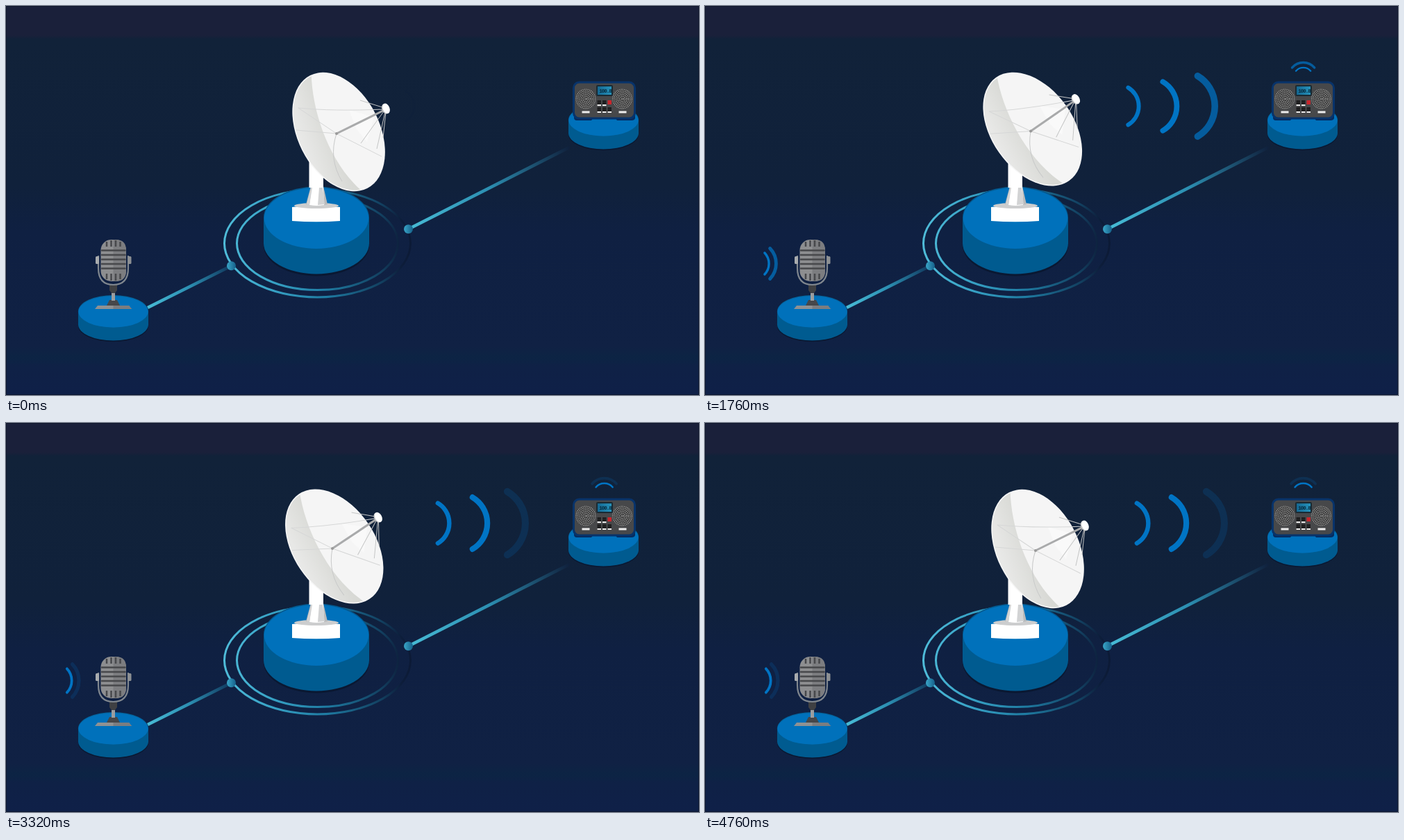
An HTML page that plays this animation: 998 px wide and 561 px high, repeating every 4.8 s.

```html
<!DOCTYPE html>
<html lang="en">
<head>
<meta charset="utf-8">
<title>Broadcast</title>
<style>
  html, body { margin: 0; width: 100%; height: 100%; overflow: hidden; background: #10213d; }
  svg { display: block; width: 100%; height: 100%; }
  .wave { fill: none; stroke: #0074c4; stroke-linecap: round; }
  .lcd { font: bold 7.5px "Liberation Mono", monospace; fill: #06293c; }
</style>
</head>
<body>
<svg viewBox="0 0 998 561">
  <defs>
    <linearGradient id="sky" x2="0" y2="1">
      <stop offset="0" stop-color="#1a203a"/>
      <stop offset=".075" stop-color="#1a203a"/>
      <stop offset=".085" stop-color="#112239"/>
      <stop offset=".46" stop-color="#10213b"/>
      <stop offset=".58" stop-color="#0f2042"/>
      <stop offset=".875" stop-color="#102144"/>
      <stop offset=".905" stop-color="#0c2444"/>
      <stop offset=".925" stop-color="#0f2146"/>
      <stop offset="1" stop-color="#0f2048"/>
    </linearGradient>
    <linearGradient id="ring" gradientUnits="userSpaceOnUse" x1="314" x2="582" y1="0" y2="0">
      <stop offset="0" stop-color="#4fbcd9"/>
      <stop offset=".25" stop-color="#38a3c6"/>
      <stop offset=".55" stop-color="#1f7ca3"/>
      <stop offset=".85" stop-color="#123f5f"/>
      <stop offset=".95" stop-color="#0d1e3b"/>
      <stop offset="1" stop-color="#0c1a36"/>
    </linearGradient>
    <linearGradient id="linkA" gradientUnits="userSpaceOnUse" x1="204" y1="435" x2="324" y2="375">
      <stop offset="0" stop-color="#48bcd6"/>
      <stop offset=".5" stop-color="#2c8fb2"/>
      <stop offset="1" stop-color="#10375c"/>
    </linearGradient>
    <linearGradient id="linkB" gradientUnits="userSpaceOnUse" x1="579" y1="322" x2="811" y2="204">
      <stop offset="0" stop-color="#48bcd6"/>
      <stop offset=".5" stop-color="#2c8fb2"/>
      <stop offset="1" stop-color="#10213d"/>
    </linearGradient>
    <linearGradient id="dot">
      <stop offset="0" stop-color="#3aa6c8"/>
      <stop offset="1" stop-color="#15608a"/>
    </linearGradient>
    <linearGradient id="shade" gradientUnits="userSpaceOnUse" x1="416" x2="500" y1="190" y2="160">
      <stop offset="0" stop-color="#ebebea"/>
      <stop offset=".6" stop-color="#d8d9d5"/>
      <stop offset="1" stop-color="#d4d5d1"/>
    </linearGradient>
    <linearGradient id="lcd" x2="1">
      <stop offset="0" stop-color="#14658f"/>
      <stop offset="1" stop-color="#2795bd"/>
    </linearGradient>
    <clipPath id="bowl">
      <ellipse rx="89.5" ry="57.5" transform="translate(479.1 181.5) rotate(63.3)"/>
    </clipPath>
    <g id="speaker">
      <circle r="14.5" fill="#383838"/>
      <g fill="none" stroke="#a8a8a8" stroke-width="1.3" stroke-dasharray="1.3 1.1">
        <circle r="1.5"/><circle r="4"/><circle r="6.5"/><circle r="9"/><circle r="11.5"/><circle r="13.8"/>
      </g>
    </g>
    <g id="base">
      <path d="M-50.5 2V21A50.5 23 0 0 0 50.5 21V2Z" fill="#0a1832"/>
      <path d="M-50.5 0V19A50.5 23.3 0 0 0 50.5 19V0Z" fill="#005b90"/>
      <ellipse rx="50.5" ry="23.3" fill="#03659f"/>
      <ellipse cy=".6" rx="50" ry="22.7" fill="#0071bb"/>
    </g>
  </defs>

  <rect width="998" height="561" fill="url(#sky)"/>
  <rect x=".5" y=".5" width="997" height="560" fill="none" stroke="#0a1226" stroke-opacity=".7"/>

  <g fill="none" stroke="url(#ring)" stroke-width="3">
    <ellipse cx="448.5" cy="342.3" rx="134" ry="77.6"/>
    <ellipse cx="448.5" cy="342.3" rx="116" ry="67.3"/>
  </g>
  <g stroke-width="4.6">
    <path d="M204 435L324 375" stroke="url(#linkA)"/>
    <path d="M579 322L811 204" stroke="url(#linkB)"/>
  </g>
  <g fill="url(#dot)">
    <circle cx="324.5" cy="374.7" r="6.5"/>
    <circle cx="579.5" cy="321.7" r="6.5"/>
  </g>

  <!-- centre platform -->
  <path d="M371 308V345A76 44.5 0 0 0 523 345V308Z" fill="#0a1832"/>
  <path d="M371 305V342A76 44.5 0 0 0 523 342V305Z" fill="#005b90"/>
  <ellipse cx="447" cy="305.2" rx="76" ry="44.8" fill="#03598f"/>
  <ellipse cx="447" cy="306" rx="75.2" ry="43.9" fill="#0071bb"/>

  <!-- dish stand -->
  <path d="M412 290Q447 286 481 290V310Q447 312.5 412 310Z" fill="#fff"/>
  <ellipse cx="447" cy="288" rx="32" ry="4" fill="#cccdce"/>
  <path d="M439 260H457L463 286Q447 290 432 286Z" fill="#b9babb"/>
  <path d="M436.5 220H457V262L458 287Q447 289 437 287L440 262H436.5Z" fill="#fff"/>
  <path d="M451 262H456L459 286L449 287Z" fill="#d2d3d4"/>
  <path d="M439 262L433 286L437 287L441 262Z" fill="#d2d3d4"/>

  <g id="dish">
    <ellipse rx="91.2" ry="59" transform="translate(479.1 181.5) rotate(63.3)" fill="#f6f6f6"/>
    <g clip-path="url(#bowl)">
      <path d="M400 80H560V280H400Z" fill="#f5f5f5"/>
      <path d="M400 80H440C436 140 462 225 516 270H400Z" fill="url(#shade)"/>
      <path d="M494 150L530 160L520 196L505 178Z" fill="#f9f9f9"/>
    </g>
    <g fill="none" stroke="#d6d7d7">
      <path d="M476 184Q464 220 484 253" stroke="#c8c9c9"/>
      <path d="M476 184L541 217M476 184L418 179M421 147L476 184"/>
      <path d="M421 147Q470 152 545 149"/>
      <path d="M510 136L545 147M547 153L543 190M546 153L534 206M544 152L511 198" stroke="#c4c5c5"/>
    </g>
    <path d="M476 184L547 149" stroke="#a9aaab" stroke-width="3"/>
    <circle cx="476" cy="184" r="2" fill="#999"/>
    <ellipse cx="546.4" cy="148.3" rx="5" ry="7.6" transform="rotate(-22 546.4 148.3)" fill="#c9caca"/>
    <ellipse cx="547.6" cy="147.8" rx="4.8" ry="7.6" transform="rotate(-22 547.6 147.8)" fill="#fff"/>
  </g>

  <!-- microphone -->
  <use href="#base" x="154.5" y="440.3"/>
  <g>
    <path d="M128 437L132 432H177L181 437Z" fill="#8f9193"/>
    <path d="M154.5 432H177L181 437H154.5Z" fill="#7b7d80"/>
    <path d="M149 424H160L164 432H145Z" fill="#46474a"/>
    <rect x="152" y="412" width="5" height="13" fill="#9b9d9f"/>
    <path d="M149 401H160V410L157 414H152L149 410Z" fill="#3f4043"/>
    <path d="M133 360V378Q133 402 154.5 402T176 378V360" fill="none" stroke="#7f868e" stroke-width="2.2"/>
    <rect x="129" y="361" width="5" height="11" rx="1.5" fill="#a8abae"/>
    <rect x="175.5" y="361" width="5" height="11" rx="1.5" fill="#8d9093"/>
    <rect x="136.5" y="337" width="36.5" height="60" rx="15" fill="#8d8e90"/>
    <path d="M154.5 337H158Q173 337 173 352V382Q173 397 158 397H154.5Z" fill="#7c7d80"/>
    <path d="M138 352.5H171.5M138 359H171.5M138 365.5H171.5M138 372H171.5M138 378.5H171.5" stroke="#47484b" stroke-width="2.5" stroke-linecap="round"/>
    <path d="M145 340V347M151.5 338V347M158 338V347M164.5 340V347M145 386V394M151.5 386V396M158 386V396M164.5 386V394" stroke="#47484b" stroke-width="2.5"/>
  </g>

  <!-- radio -->
  <use href="#base" x="860.5" y="164.3"/>
  <g>
    <path d="M818 158H906V162Q905 165 901 165H880L877 161H846L843 165H822Q818 165 818 161Z" fill="#062b5e"/>
    <rect x="817.5" y="110" width="88" height="52" rx="8" fill="#47484a" stroke="#08336a" stroke-width="3"/>
    <use href="#speaker" x="835" y="134"/>
    <use href="#speaker" x="887.5" y="134"/>
    <rect x="851" y="115" width="22" height="14" rx="1" fill="url(#lcd)" stroke="#1a2a33" stroke-width="2"/>
    <text class="lcd" x="863" y="125" text-anchor="middle" letter-spacing="-1">100.8</text>
    <g fill="#1f1f20">
      <path d="M851.5 136H857V144H851.5ZM859 136H864.5V144H859ZM851.5 146H857V154H851.5ZM859 146H864.5V154H859ZM866.5 146H872V154H866.5Z"/>
      <path d="M866.5 136H872V142H866.5Z" fill="#c9262c"/>
      <path d="M851.5 142H857V144H851.5ZM859 142H864.5V144H859ZM851.5 152H857V154H851.5ZM859 152H864.5V154H859ZM866.5 152H872V154H866.5ZM829.5 151.5H840.5V154.5H829.5ZM882.5 151.5H893.5V154.5H882.5Z" fill="#ededed"/>
    </g>
  </g>

  <g id="waves"></g>
</svg>
<script>
  const LOOP = 4800, BEAT = 480, FADE = 220;
  const dish = document.getElementById('dish');
  const layer = document.getElementById('waves');

  // bulge: arc depth relative to half its height
  function makeWave(count, bulge, place) {
    const r = (1 + bulge * bulge) / (2 * bulge);
    const arcs = Array.from({ length: count }, () => {
      const p = document.createElementNS('http://www.w3.org/2000/svg', 'path');
      p.setAttribute('class', 'wave');
      p.setAttribute('stroke-width', 0.22);
      p.setAttribute('d', `M0-1A${r} ${r} 0 0 1 0 1`);
      return layer.appendChild(p);
    });
    return { arcs, place, life: count * BEAT };
  }

  const waves = [
    makeWave(3, 0.57, a => `translate(${575.9 + a * 0.1042} 144.5) scale(${21.3 + a * 0.0174})`),
    makeWave(2, 0.4, a => `translate(${80.7 + a * 0.0161} 371.5) scale(${11.2 + a * 0.0135})`),
    makeWave(2, 0.46, a => `translate(861.6 ${97 - a * 0.0102}) rotate(-90) scale(${7 + a * 0.0113})`)
  ];

  const clamp = v => Math.max(0, Math.min(1, v));
  const ease = p => (1 - Math.cos(Math.PI * clamp(p))) / 2;

  function draw(t) {
    const turn = ease(t / 2400) - ease((t - 2480) / 2380);
    dish.setAttribute('transform', `rotate(${-10.2 * turn} 449 229)`);
    for (const { arcs, place, life } of waves) {
      arcs.forEach((arc, i) => {
        const age = t % BEAT + i * BEAT;
        const alpha = age > t ? 0 : clamp(Math.min(age, life - age) / FADE);
        arc.setAttribute('opacity', alpha);
        arc.setAttribute('transform', place(age));
      });
    }
  }

  const start = performance.now();
  function tick() {
    draw((performance.now() - start) % LOOP);
    requestAnimationFrame(tick);
  }
  tick();
</script>
</body>
</html>
```
